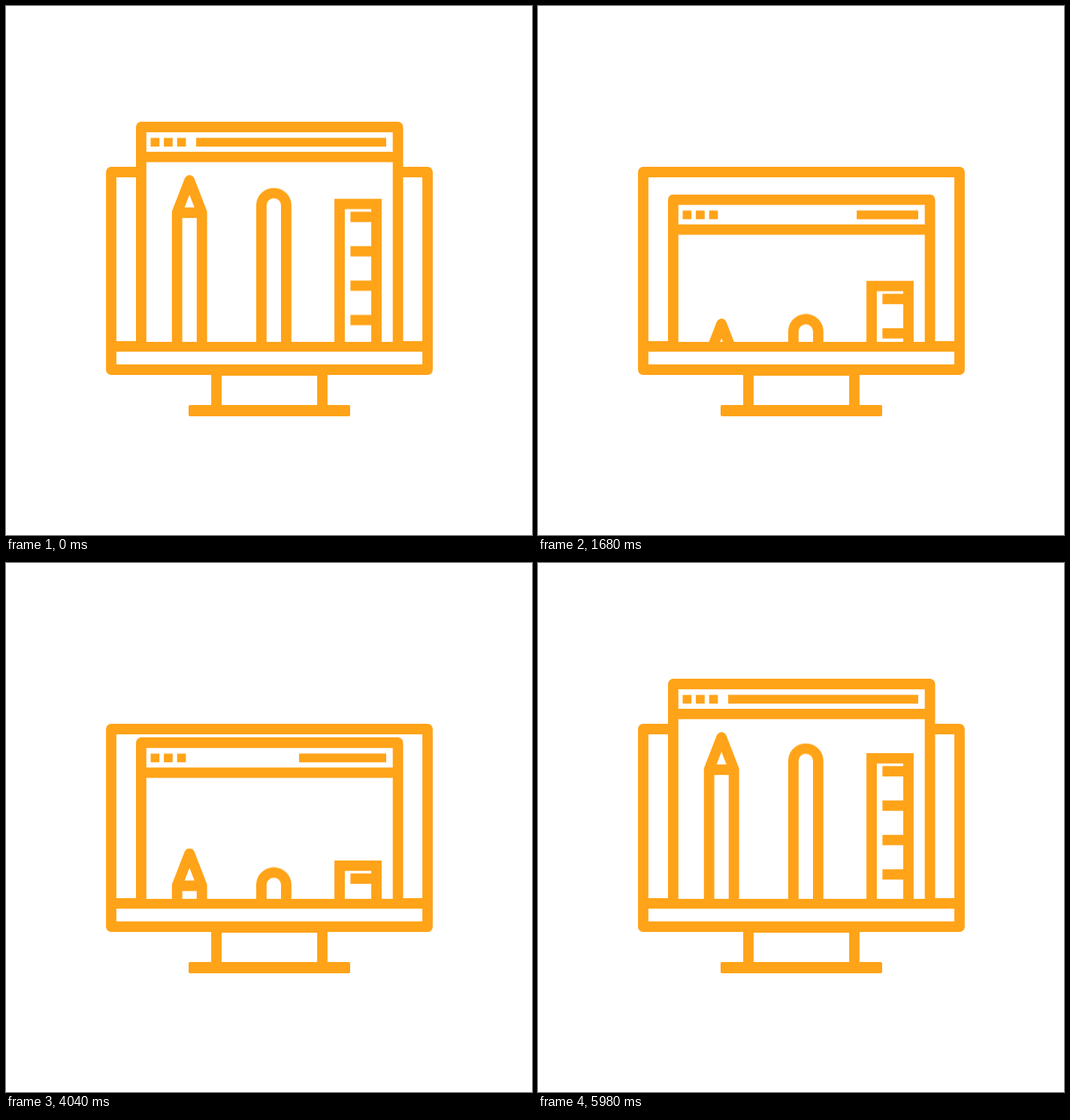
An HTML page that plays this animation: 700 by 704 pixels, repeating every 6 s.

```html
<!DOCTYPE html>
<html lang="en">
<head>
<meta charset="utf-8">
<title>Design tools on a monitor</title>
<style>
  html, body { margin: 0; width: 100%; height: 100%; overflow: hidden; background: #fff; }
  svg { display: block; width: 700px; height: 704px; }

  .line { fill: none; stroke: #ffa318; stroke-width: 13.8; stroke-linejoin: round; }
  .solid { fill: #ffa318; stroke: none; }
  .paper { fill: #fff; }

  /* This curve equals smoothstep: 3u^2 - 2u^3 */
  .slide { animation: slide 1500ms cubic-bezier(.3333, 0, .6667, 1) infinite alternate; }
  .window { --low: 100.7px; }
  .pencil { --low: 199px; }
  .arch { --low: 192.5px; animation-delay: -120ms; }
  .ruler { --low: 162.3px; animation-delay: -280ms; }
  @keyframes slide {
    from { transform: translateY(0); }
    to { transform: translateY(var(--low)); }
  }

  .address {
    transform-origin: 506px 0;
    animation: address 6000ms cubic-bezier(.3333, 0, .6667, 1) infinite;
  }
  @keyframes address {
    0%, 100% { transform: scaleX(1); }
    25% { transform: scaleX(.3123); }
    50% { transform: scaleX(.5905); }
    75% { transform: scaleX(.4206); }
  }
</style>
</head>
<body>
<svg viewBox="0 0 700 704">
  <defs>
    <clipPath id="screen"><rect width="700" height="446.5"/></clipPath>
  </defs>

  <!-- Monitor and stand -->
  <g class="line">
    <rect x="140" y="221" width="421" height="263"/>
    <path d="M140 453H561M280 485V535M421 485V535"/>
  </g>
  <path class="solid" d="M273 484H428V492H273Z"/>
  <rect class="solid" x="243" y="531" width="215" height="15" rx="2"/>

  <g clip-path="url(#screen)">
    <!-- Browser window -->
    <g class="slide window">
      <path class="line paper" style="fill:#fff" d="M179.9 500V161H521.6V500"/>
      <path class="line" d="M179.9 200.8H521.6"/>
      <path class="solid" d="M192.5 175.4h11.7v11.7h-11.7zM210.1 175.4h11.7v11.7h-11.7zM227.7 175.4h11.7v11.7h-11.7z"/>
      <rect class="solid address" x="253" y="175.4" width="253" height="11.7"/>
    </g>

    <!-- Tools -->
    <path class="line slide pencil" d="M227.7 500V274.5L244.2 232L260.7 274.5V500M227.7 275H260.7"/>
    <path class="line slide arch" d="M339.9 500V260.8a16.5 16.5 0 0 1 33 0V500"/>
    <g class="line slide ruler" style="stroke-linejoin:miter">
      <path d="M444 500V246.8H493V500"/>
      <path d="M458.4 264.2H493m-34.6 45.7H493m-34.6 45.7H493m-34.6 45.7H493m-34.6 45.7H493"/>
    </g>
  </g>
</svg>
</body>
</html>
```
